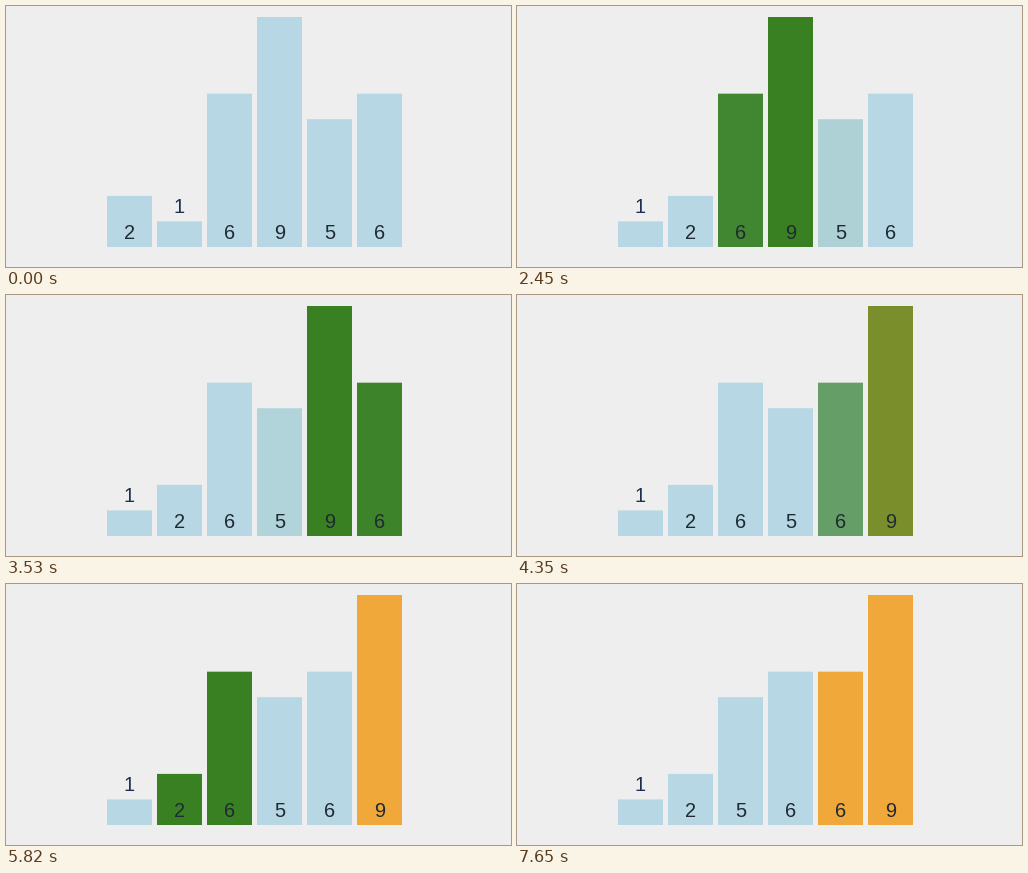
Write a matplotlib script that moves like this. It is 505 px wide and 261 px high and loops after 8 s.

```python
import numpy as np
import matplotlib.pyplot as plt
from matplotlib.animation import FuncAnimation
from matplotlib.patches import Rectangle

W, H, DPI = 505, 261, 64
LOOP, TICK, STEP = 8000, 20, 70
BASE, UNIT = 241, 230 / 9

BLUE = np.array([182, 215, 227]) / 255
GREEN = np.array([56, 128, 34]) / 255
ORANGE = np.array([240, 168, 58]) / 255
INK, NAVY = "#1f2a33", "#1f2d55"

START = [2, 1, 6, 9, 5, 6]

# Eased progress at each visible step of a transition
EASE = {4: (0.07, 0.36, 0.96, 1), 5: (0.03, 0.25, 0.75, 0.97, 1)}

# (start ms, steps, new bar colours, index of the pair to swap)
EVENTS = [
    (620, 4, {0: GREEN, 1: GREEN}, None),
    (1090, 4, {}, 0),
    (1570, 4, {0: BLUE, 2: GREEN}, None),
    (2040, 4, {1: BLUE, 3: GREEN}, None),
    (2450, 4, {2: BLUE, 4: GREEN}, None),
    (2920, 4, {}, 3),
    (3390, 4, {3: BLUE, 5: GREEN}, None),
    (3800, 5, {}, 4),
    (4280, 4, {4: BLUE, 5: ORANGE}, None),
    (5140, 4, {0: GREEN, 1: GREEN}, None),
    (5610, 4, {0: BLUE, 2: GREEN}, None),
    (6080, 4, {1: BLUE, 3: GREEN}, None),
    (6500, 5, {}, 2),
    (6970, 4, {2: BLUE, 4: GREEN}, None),
    (7440, 4, {3: BLUE, 4: ORANGE}, None),
]


def mix(a, b, k):
    return a + (b - a) * k


def state(t):
    """Values, bar heights and bar colours at time t."""
    values = list(START)
    heights = [float(v) for v in START]
    colors = [BLUE] * len(START)
    for start, steps, paint, pair in EVENTS:
        if t < start:
            break
        k = EASE[steps][min(int((t - start) // STEP), steps - 1)]
        for i, color in paint.items():
            colors[i] = mix(colors[i], color, k)
        if pair is not None:
            i, j = pair, pair + 1
            values[i], values[j] = values[j], values[i]
            for n in (i, j):
                heights[n] = mix(heights[n], values[n], k)
    return values, heights, colors


plt.rcParams["font.family"] = "Liberation Sans"
fig = plt.figure(figsize=(W / DPI, H / DPI), dpi=DPI, facecolor="#eeeeee")
ax = fig.add_axes([0, 0, 1, 1])
ax.set(xlim=(0, W), ylim=(H, 0))
ax.axis("off")

bars, labels = [], []
for i in range(len(START)):
    x = 101 + 50 * i
    bars.append(ax.add_patch(Rectangle((x, BASE), 45, 0, lw=0, snap=False)))
    labels.append(ax.text(x + 22.5, 233, "", fontsize=20 * 72 / DPI,
                          ha="center", va="baseline"))


def draw(frame):
    values, heights, colors = state(frame * TICK + TICK / 2)
    for bar, label, v, h, c in zip(bars, labels, values, heights, colors):
        bar.set_height(-h * UNIT)
        bar.set_facecolor(c)
        small = v == 1
        label.set_text(str(v))
        label.set_y(207 if small else 233)
        label.set_color(NAVY if small else INK)
    return bars + labels


anim = FuncAnimation(fig, draw, frames=LOOP // TICK, interval=TICK,
                     repeat=True, repeat_delay=0, blit=False)
plt.show()
```
